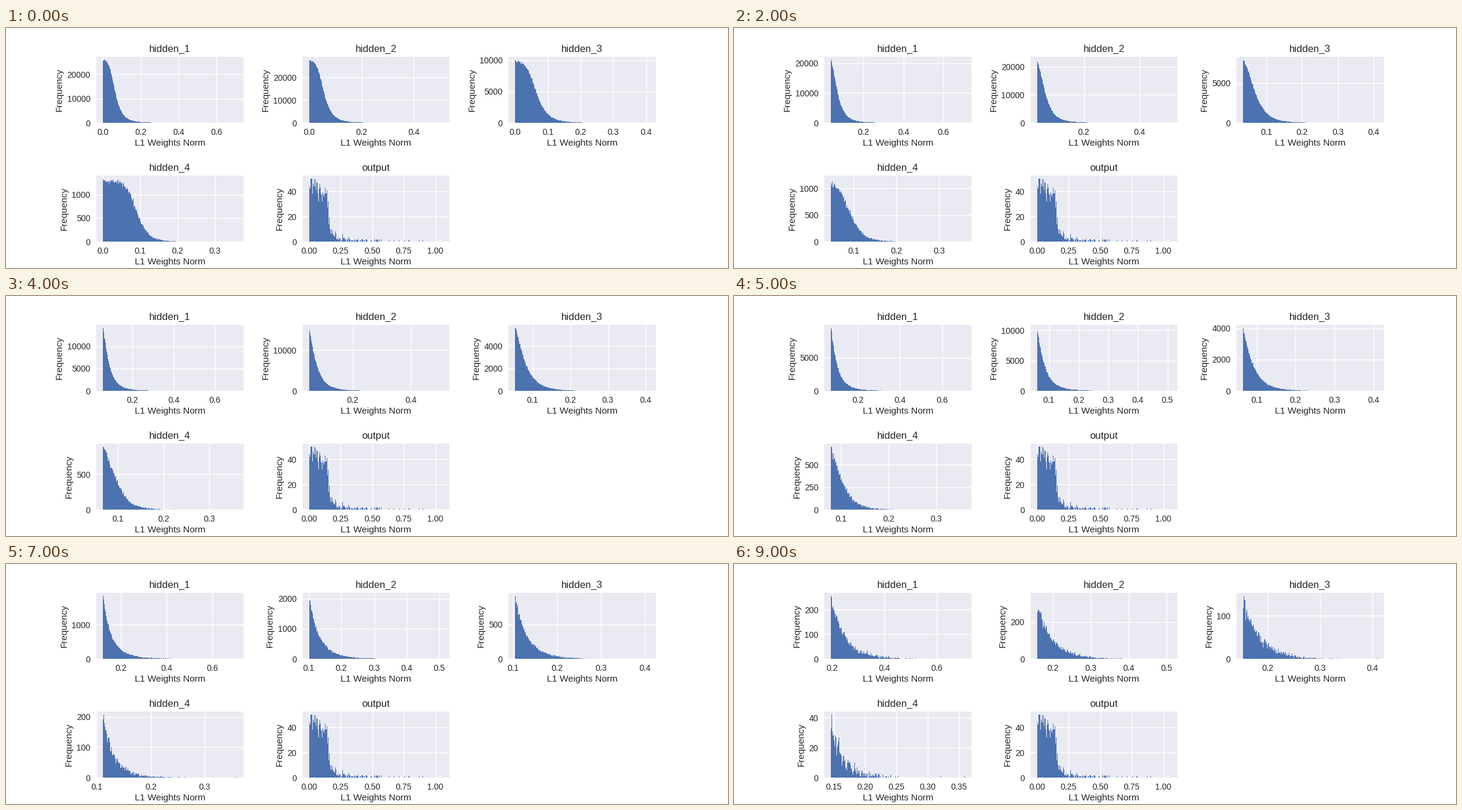
Write a matplotlib script that moves like this. It is 1200 by 400 pixels and loops after 10 s.

```python
import numpy as np
import matplotlib.pyplot as plt
from matplotlib.animation import FuncAnimation

BINS = 300
SPARSITY = [0, .25, .5, .6, .7, .8, .9, .95, .97, .99]

# name: weight count, largest weight, edge of the bulk, steepness, slope of the top
LAYERS = {
    "hidden_1": (784000, 0.707, 0.0664, 3.65, 0.6),
    "hidden_2": (1000000, 0.5115, 0.0585, 3.75, 0.6),
    "hidden_3": (500000, 0.4093, 0.0675, 4, 0.4),
    "hidden_4": (100000, 0.3595, 0.0932, 6, 0),
}
OUTPUT_LARGEST = 1.0595
OUTPUT_PEAK = 50

plt.rcParams.update({
    "font.family": "Liberation Sans",
    "text.color": ".15",
    "axes.labelcolor": ".15",
    "axes.facecolor": "#EAEAF2",
    "axes.axisbelow": True,
    "axes.grid": True,
    "axes.titlesize": 12,
    "axes.labelsize": 11,
    "grid.color": "white",
    "grid.linewidth": 1,
})
for axis, pad in (("xtick", 6.3), ("ytick", 7)):
    plt.rcParams.update({f"{axis}.color": ".15", f"{axis}.labelsize": 10,
                         f"{axis}.major.size": 0, f"{axis}.major.pad": pad})

rng = np.random.default_rng(7)


def sample_weights(size, largest, edge, steepness, slope):
    """Sorted weights from a flat bulk with a power-law flank and a soft cut-off."""
    x = np.linspace(0, largest, 4000)
    u = x / largest
    density = np.exp(-slope * u - 6.5 * u**3) / (1 + (x / edge) ** steepness)
    cdf = np.cumsum(density) - density[0]
    weights = np.sort(np.interp(rng.random(size), cdf / cdf[-1], x))
    weights[-1] = largest
    return weights


def prune(weights):
    """Histogram of the weights that survive each sparsity level."""
    return [np.histogram(weights[int(len(weights) * s):], BINS) for s in SPARSITY]


def output_histogram():
    edges = np.linspace(0, OUTPUT_LARGEST, BINS + 1)
    x = edges[:-1]
    mean = 34 / (1 + (x / 0.155) ** 20) + 11 * np.exp(-x / 0.16)
    counts = rng.binomial(80, mean / 80)
    return np.minimum(counts, OUTPUT_PEAK), edges


def make_panel(position, title):
    ax = fig.add_subplot(2, 3, position)
    ax.set_title(title)
    ax.set_xlabel("L1 Weights Norm", labelpad=3.3)
    ax.set_ylabel("Frequency")
    ax.spines[:].set_visible(False)
    bars = ax.bar(range(BINS), np.ones(BINS), color="#4C72B0", linewidth=0)
    return ax, bars


def show_histogram(ax, bars, counts, edges):
    low, high = edges[0], edges[-1]
    width = (high - low) / BINS
    for bar, left, count in zip(bars, edges, counts):
        bar.set_bounds(left, 0, width, count)
    margin = 0.05 * (high - low)
    ax.set_xlim(low - margin, high + margin)
    ax.set_ylim(0, 1.05 * counts.max())


fig = plt.figure(figsize=(12, 4), dpi=100, facecolor="white")
fig.subplots_adjust(left=0.125, right=0.9, bottom=0.11, top=0.88,
                    wspace=0.4, hspace=0.8)

panels = [(*make_panel(i, name), prune(sample_weights(*shape)))
          for i, (name, shape) in enumerate(LAYERS.items(), 1)]
show_histogram(*make_panel(5, "output"), *output_histogram())


def update(step):
    for ax, bars, histograms in panels:
        show_histogram(ax, bars, *histograms[step])
    return []


anim = FuncAnimation(fig, update, frames=len(SPARSITY), init_func=lambda: update(0),
                     interval=1000, repeat=True, repeat_delay=0, blit=False)
plt.show()
```
